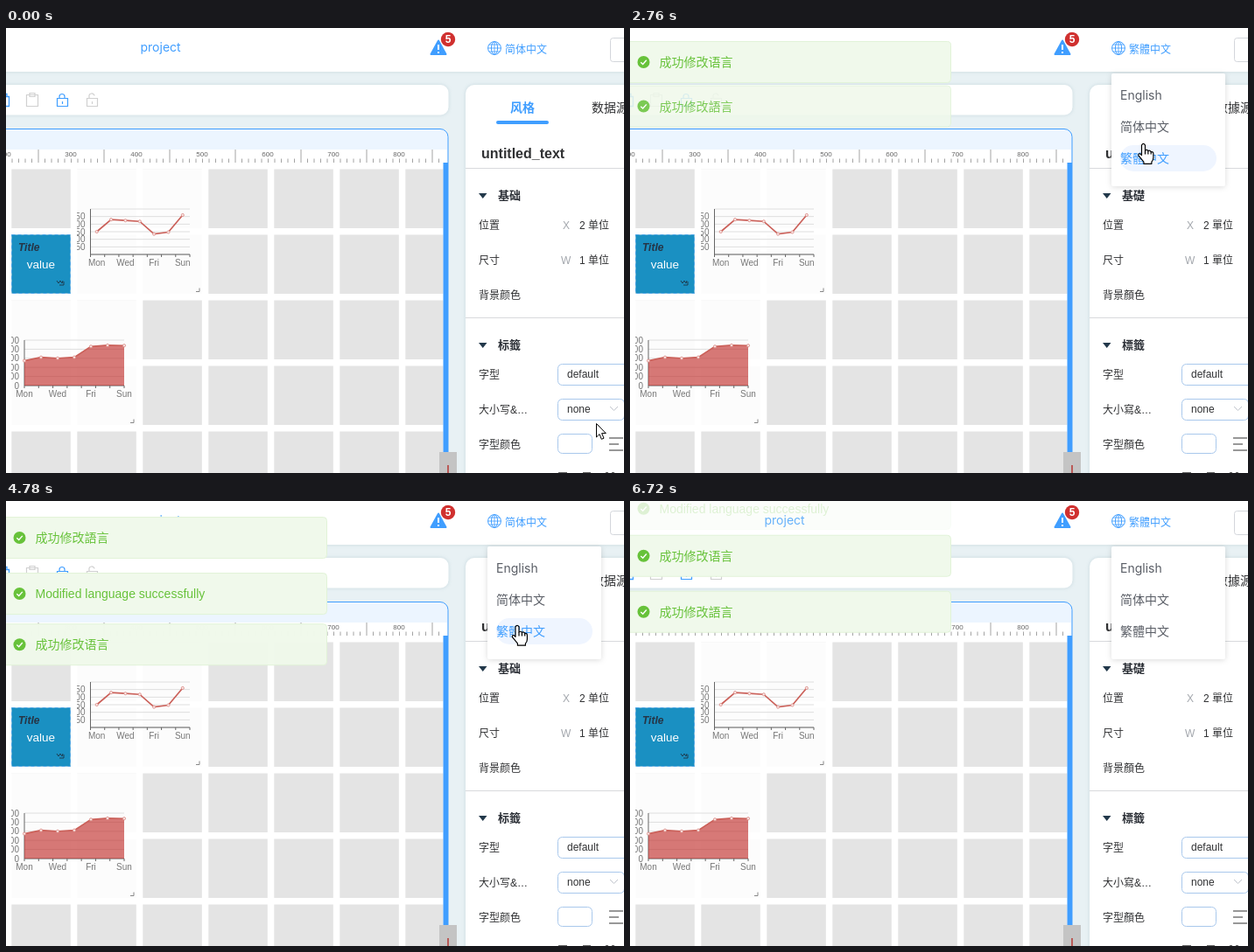
Recreate the animation shown at these times as an HTML page. Size 706 by 509 pixels, loop 6.8 s.

```html
<!DOCTYPE html>
<html lang="zh">
<head>
<meta charset="utf-8">
<title>Language switch</title>
<style>
html, body { margin: 0; width: 100%; height: 100%; overflow: hidden; background: #e8f1f4; }
svg { display: block; width: 706px; height: 509px; }
text { font: 12px "Liberation Sans", "Noto Sans CJK SC", "Noto Sans CJK", sans-serif; fill: #303133; white-space: pre; }
.ui { font-family: Inter, "Noto Sans CJK SC", "Noto Sans CJK", sans-serif; font-size: 14px; }
.blue { fill: #409eff; }
.grey { fill: #a3a7ad; }
.head { font-size: 13px; font-weight: bold; fill: #2b2f36; }
.tab { font-size: 14px; }
.item { fill: #5a5e66; }
.tick { font-size: 8px; fill: #666; text-anchor: middle; }
.axis { font-size: 10px; fill: #777; }
.line { fill: none; stroke: #409eff; }
.card { fill: #fff; filter: drop-shadow(0 0 2px rgba(60, 110, 130, .18)); }
.field { fill: #fff; stroke: #a9c8ec; }
.toast rect { fill: #f0f9eb; stroke: #e1f3d8; }
.toast text { font-size: 14px; fill: #67c23a; }
.pill { fill: #eff5ff; }
#menu { transform-origin: 615px 52px; filter: drop-shadow(0 1px 3px rgba(0, 0, 0, .14)); }
</style>
</head>
<body>
<svg viewBox="0 0 706 509">
  <rect width="706" height="509" fill="#e8f1f4"/>

  <!-- header -->
  <rect x="-9" y="-9" width="724" height="59" class="card"/>
  <text x="153.5" y="27" class="ui blue">project</text>
  <path d="M494 14.5L502.5 30H485.5Z" fill="#409eff" stroke="#409eff" stroke-width="2" stroke-linejoin="round"/>
  <path d="M494 19V25M494 27V29" stroke="#fff" stroke-width="2"/>
  <circle cx="505" cy="13" r="8.2" fill="#d0302f"/>
  <text x="505" y="17.3" text-anchor="middle" style="fill:#fff;font-weight:bold">5</text>
  <g class="line">
    <circle cx="558" cy="23" r="7.4"/>
    <ellipse cx="558" cy="23" rx="3.6" ry="7.4"/>
    <path d="M550.6 23H565.4M552 19H564M552 27H564M558 15.6V30.4" stroke-width=".8"/>
  </g>
  <text x="570" y="28.5" class="blue" data-k="0"></text>
  <rect x="690.5" y="11.5" width="40" height="27" rx="3" fill="#fff" stroke="#d3d6db"/>

  <!-- toolbar -->
  <rect x="-20" y="65" width="525.5" height="34.5" rx="9" class="card"/>
  <path d="M-4 78.5H3.5V89.5H-4M-3 75.5H1V78" class="line" stroke-width="1.3"/>
  <path d="M23.5 76.5H36.5V89.5H23.5ZM27 74.5H33V78.5H27Z" fill="none" stroke="#d0d0d0" stroke-width="1.2"/>
  <path d="M58.5 80.5H70.5V89.5H58.5ZM61 80V78.5A3 3 0 0 1 67 78.5V80M64.5 84V87" class="line" stroke-width="1.2"/>
  <path d="M92.5 80.5H104.5V89.5H92.5ZM95 80V78.5A3 3 0 0 1 101 77.5M98.5 84V87" fill="none" stroke="#d0d0d0" stroke-width="1.2"/>

  <!-- canvas -->
  <rect x="-20" y="115.5" width="525" height="420" rx="9" fill="#ecf5ff" stroke="#409eff"/>
  <rect y="139" width="504" height="370" fill="#fff"/>
  <g id="ruler"></g>
  <g id="cells" fill="#e4e4e4"></g>
  <rect x="499.5" y="154" width="5.5" height="355" fill="#409eff"/>
  <rect x="495" y="485" width="20" height="24" fill="#c4c4c4"/>
  <path d="M505 500V509" stroke="#b8403c" stroke-width="1.6"/>
  <g id="charts"></g>
  <rect x="6.5" y="236.5" width="67" height="67" fill="#1a90c2" stroke="#4fa6e6" stroke-dasharray="4 3"/>
  <text x="14" y="255" style="font-weight:bold;font-style:italic;fill:#263445">Title</text>
  <text x="40" y="275" text-anchor="middle" style="font-size:13.5px;fill:#fff">value</text>
  <path d="M58 289L60 292L62 289L64 292L65 289M61 294H66V290" fill="none" stroke="#1d3c50"/>

  <!-- side panel -->
  <rect x="525" y="65" width="200" height="460" rx="10" class="card"/>
  <text x="576" y="96" class="tab blue" style="font-weight:bold" data-k="1"></text>
  <rect x="560" y="106" width="60" height="4" rx="2" class="blue"/>
  <text x="669" y="96" class="tab" data-k="2"></text>
  <text x="543" y="149" style="font-size:16px;font-weight:bold">untitled_text</text>
  <path d="M525 160.5H706M525 331.5H706" stroke="#d8dadd"/>
  <path d="M540 189H549.5L544.75 195ZM540 360H549.5L544.75 366Z" fill="#22384a"/>
  <text x="562" y="196" class="head" data-k="3"></text>
  <text x="540" y="230" data-k="4"></text>
  <text x="636" y="230" class="grey">X</text>
  <text x="655" y="230" data-k="5"></text>
  <text x="540" y="270" data-k="6"></text>
  <text x="634" y="270" class="grey">W</text>
  <text x="655" y="270" data-k="7"></text>
  <text x="540" y="310" data-k="8"></text>
  <text x="562" y="367" class="head" data-k="9"></text>
  <text x="540" y="401" data-k="10"></text>
  <text x="540" y="441" data-k="11"></text>
  <text x="540" y="481" data-k="12"></text>
  <rect x="630.5" y="384.5" width="90" height="24" rx="5" class="field"/>
  <text x="641" y="400">default</text>
  <rect x="630.5" y="424.5" width="76" height="24" rx="5" class="field"/>
  <text x="641" y="440">none</text>
  <path d="M690 433L694.5 437.5L699 433" fill="none" stroke="#c0c4cc"/>
  <rect x="630.5" y="464.5" width="39" height="22" rx="5" class="field"/>
  <path d="M689 469H705M689 476H700M689 483H705" stroke="#777" stroke-width="1.6"/>
  <path d="M631 508.5H641M659 508.5H668M685 508.5H688M692 508.5H695" stroke="#666"/>

  <g id="menu">
    <rect x="550" y="52" width="130" height="129" rx="2" fill="#fff"/>
    <g id="items"></g>
  </g>
  <g id="toasts"></g>
  <circle id="press" r="12" fill="#ece61e" fill-opacity=".62"/>
  <path id="arrow" d="M.5.5V16L4 12.6 6.3 18.3 9 17.2 6.6 11.6H11.3Z" fill="#fff" stroke="#000"/>
  <g id="hand" fill="#fff" stroke="#000" stroke-width="1.2" stroke-linejoin="round">
    <path d="M-2 2Q0-1.2 2 2V8Q4 6.5 5.4 8.5Q7.4 7.3 8.7 9.6Q11.4 9 11.4 12V16Q11.4 19 9.4 21V23.3H.4V21Q-3 17-5.6 13.8Q-6 10.8-3.4 12L-2 13.4Z"/>
    <path d="M2 8V12.5M5.4 8.5V12.5M8.7 9.6V12.5" fill="none"/>
  </g>
</svg>
<script>
const LOOP = 6800;
const $ = id => document.getElementById(id);
const range = n => [...Array(n).keys()];
const clamp = v => Math.min(1, Math.max(0, v));

const cn = ['简体中文', '风格', '数据源', '基础', '位置', '2 单位', '尺寸', '1 单位', '背景颜色', '标籤', '字型', '大小写&…', '字型颜色'];
const tw = ['繁體中文', '風格', '數據源', '基礎', '位置', '2 單位', '尺寸', '1 單位', '背景顏色', '標籤', '字型', '大小寫&…', '字型顏色'];
const en = ['English', 'Style', 'Data source', 'Basic', 'Position', '2 Unit', 'Size', '1 Unit', 'Backgro…', 'Label', 'Font', 'Case&Sp…', 'Font color'];
const langs = [[0, cn], [2590, tw], [3570, en], [4480, cn], [5460, tw]];

// text, shown from, closed at
const done = { cn: '成功修改语言', tw: '成功修改語言', en: 'Modified language successfully' };
const toasts = [
  [done.cn, 1530, 4490], [done.tw, 2590, 5586], [done.en, 3580, 6575],
  [done.cn, 4500, 7500], [done.tw, 5460, 8460]
];

// time, x, y of the pointer tip
const path = [
  [70, 674, 452], [470, 594, 15], [750, 580.5, 31], [900, 580.5, 31], [1430, 588, 107], [1590, 588, 107],
  [1970, 588, 150], [2610, 587, 150], [3070, 585, 79], [3620, 585, 79], [4150, 587, 123],
  [4400, 587, 123], [4800, 584, 142], [4930, 584, 148], [5720, 584, 148], [6100, 628, 472], [LOOP, 628, 472]
];
const presses = [[1430, 1590], [2440, 2610], [3540, 3620], [4230, 4400], [5330, 5480]];

// cubic-bezier(.25, .1, .25, 1)
function ease(x) {
  x = clamp(x);
  let lo = 0, hi = 1, s = x;
  for (let i = 0; i < 24; i++) {
    s = (lo + hi) / 2;
    const at = .75 * s * (1 - s) + s ** 3;
    at < x ? lo = s : hi = s;
  }
  return .3 * s * (1 - s) ** 2 + 3 * s * s * (1 - s) + s ** 3;
}

function chart({ x, step, left, right, top, data, max, rows, labels, area, box }) {
  const base = top + 52, y = v => base - 52 * v / max;
  const pts = data.map((v, i) => [x + step * i, y(v)]);
  const poly = pts.map(p => p.join()).join(' ');
  const id = 'clip' + top;
  const grid = range(rows + 1).map(i => `<path d="M${left} ${base - 52 * i / rows}H${right}" stroke="#dedede"/>`).join('');
  const names = range(rows + 1).filter(labels).map(i =>
    `<text class="axis" text-anchor="end" x="${left - 6}" y="${base - 52 * i / rows + 3.5}">${max / rows * i}</text>`).join('');
  const days = ['Mon', 'Wed', 'Fri', 'Sun'].map((d, i) =>
    `<text class="axis" text-anchor="middle" x="${x + step * 2 * i}" y="${base + 13}">${d}</text>`).join('');
  const [bx, by] = box;
  return `<rect x="${bx}" y="${by}" width="143" height="143" fill="#fff" fill-opacity=".9"/>
    <clipPath id="${id}"><rect x="${bx}" y="${by}" width="143" height="143"/></clipPath>
    <g clip-path="url(#${id})">${grid}${names}${days}
    <path d="M${left} ${top}V${base}H${right}${range(8).map(i => `M${left + (right - left) / 7 * i} ${base}v3`).join('')}" fill="none" stroke="#666"/>
    ${area ? `<polygon points="${left},${base} ${poly} ${right},${base}" fill="#c23531" fill-opacity=".66"/>` : ''}
    <polyline points="${poly}" fill="none" stroke="#cb615a" stroke-width="1.7"/>
    ${pts.map(p => `<circle cx="${p[0]}" cy="${p[1]}" r="1.6" fill="#fbe9e7" stroke="#d98a84" stroke-width=".8"/>`).join('')}</g>
    <path d="M${bx + 136} ${by + 140}h4v-4" fill="none" stroke="#888"/>`;
}

$('ruler').innerHTML = range(67).map(k => {
  const x = -.5 + 7.5 * k, top = k % 10 === 5 ? 139 : 149.5;
  return `<path d="M${x} ${top}V154" stroke="#9a9a9a" stroke-width=".9"/>`;
}).join('') + range(7).map(i => `<text class="tick" x="${-1 + 75 * i}" y="147">${200 + 100 * i}</text>`).join('');

$('cells').innerHTML = range(35).map(i => {
  const x = 6.3 + 75 * (i % 7);
  return `<rect x="${x}" y="${161.5 + 75 * Math.floor(i / 7)}" width="${Math.min(67.5, 499.5 - x)}" height="67.5"/>`;
}).join('');

$('charts').innerHTML = chart({
  x: 103.7, step: 16.35, left: 96.5, right: 210, top: 207, max: 300, rows: 6, box: [81, 161.5],
  data: [150, 230, 224, 218, 135, 147, 260], labels: i => i > 0 && i < 6
}) + chart({
  x: 21, step: 19, left: 21, right: 135, top: 357, max: 1500, rows: 5, box: [6, 311.5],
  data: [820, 932, 901, 934, 1290, 1330, 1320], labels: () => true, area: true
});

$('items').innerHTML = ['English', '简体中文', '繁體中文'].map((s, i) =>
  `<g><rect class="pill" x="560" y="${62 + 36 * i}" width="110" height="30" rx="15"/>
   <text class="ui item" x="560" y="${82 + 36 * i}">${s}</text></g>`).join('');

$('toasts').innerHTML = toasts.map(([s]) =>
  `<g class="toast"><rect x="-20" y=".5" width="386.5" height="47" rx="4"/>
   <circle cx="15.5" cy="24" r="7" fill="#67c23a"/>
   <path d="M12.3 24.2L14.7 26.5L18.8 21.8" fill="none" stroke="#fff" stroke-width="1.4"/>
   <text x="33.5" y="29">${s}</text></g>`).join('');

const labels = [...document.querySelectorAll('[data-k]')];
const items = [...$('items').children];
const toastEls = [...$('toasts').children];
const show = (el, on) => el.style.display = on ? '' : 'none';
const place = (el, x, y) => el.setAttribute('transform', `translate(${x} ${y})`);

function pointer(t) {
  const i = path.findIndex(p => p[0] > t);
  if (i < 1) return path[0].slice(1);
  const [t0, x0, y0] = path[i - 1], [t1, x1, y1] = path[i];
  let p = (t - t0) / (t1 - t0);
  p = p * p * (3 - 2 * p);
  return [x0 + (x1 - x0) * p, y0 + (y1 - y0) * p];
}

function drawToast(el, i, t) {
  const [, start, end] = toasts[i];
  const since = (at, ms) => ease((t - at) / ms);
  const closed = toasts.slice(0, i).reduce((sum, [, , e]) => sum + (e <= start ? 1 : since(e, 400)), 0);
  const y = 15 + 64 * (i - closed) - 48 * (1 - since(start, 400) + since(end, 400));
  show(el, t >= start && t < end + 400);
  place(el, 0, y);
  el.style.opacity = since(start, 300) * (1 - since(end, 300));
}

let lang;
function render(t) {
  const now = langs.filter(l => l[0] <= t).pop()[1];
  if (now !== lang) {
    lang = now;
    labels.forEach(el => el.textContent = lang[el.dataset.k]);
  }

  const open = ease((t - 530) / 220);
  show($('menu'), open > 0);
  $('menu').style.opacity = open;
  $('menu').style.transform = `scaleY(${open})`;

  const [x, y] = pointer(t);
  const row = t > 750 && x > 550 && x < 680 ? Math.floor((y - 59) / 36) : -1;
  items.forEach((el, i) => {
    show(el.firstElementChild, i === row);
    el.lastElementChild.classList.toggle('item', i !== row);
    el.lastElementChild.classList.toggle('blue', i === row);
  });
  toastEls.forEach((el, i) => drawToast(el, i, t));

  const overLink = y < 40 || (t > 750 && y < 181);
  show($('hand'), overLink && t < 6180);
  show($('arrow'), !overLink && t < 6180);
  show($('press'), presses.some(([a, b]) => t >= a && t < b));
  ['hand', 'arrow', 'press'].forEach(id => place($(id), x, y));
}

const began = performance.now();
function frame() {
  render((performance.now() - began) % LOOP);
  requestAnimationFrame(frame);
}
frame();
</script>
</body>
</html>
```
